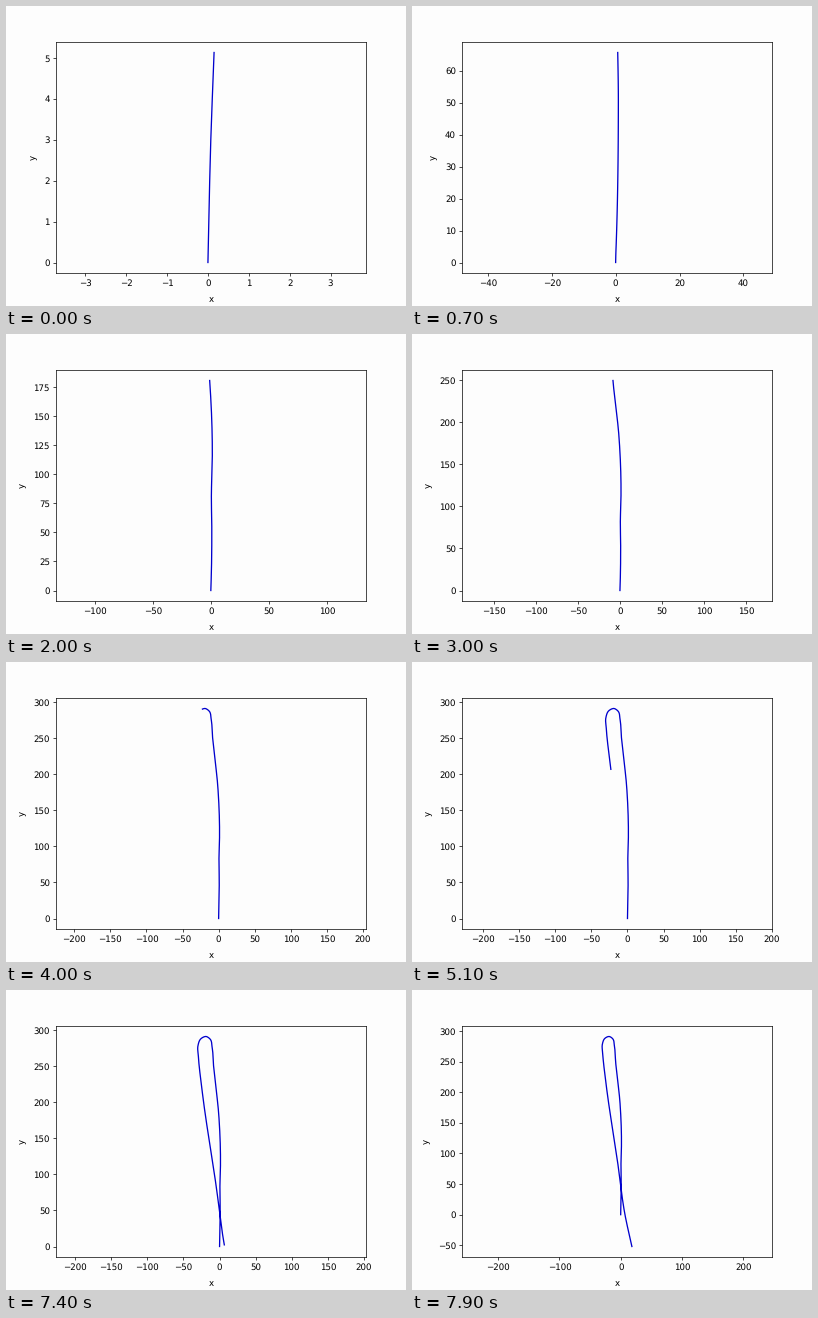
Animation, 400 px wide and 300 px high, one loop 8 s. Source, as a matplotlib script:

```python
import numpy as np
import matplotlib.pyplot as plt
from matplotlib.animation import FuncAnimation

FRAMES, INTERVAL = 80, 100
MARGIN = 0.05
PAPER = "#fdfdfd"

# Key points of the track: straight out, a tight left turn, and back
TRACK = np.array([
    (0, 0), (0.07, 3), (0.15, 5.14), (0.85, 50), (0.5, 85), (1.2, 108),
    (-1, 181), (-8.3, 250), (-10.2, 275), (-13, 287.3), (-18.7, 291),
    (-26, 287.8), (-30, 278), (-29.4, 264), (-24.3, 217),
    (-4.9, 85), (7, 0), (18.3, -52),
])

# Distance covered by a few moments: cruise, brake into the turn, speed up
TICKS = np.array([0, 14, 20, 30, 40, 45, 54, 66, 79])
COVERED = np.array([5.14, 127, 181, 250.4, 298.8, 319.5, 419.3, 508.2, 647.2])


def smooth(x, xs, ys):
    """Cubic Hermite curve through the points (xs, ys)."""
    slope = np.gradient(ys, xs)
    i = np.clip(np.searchsorted(xs, x, side="right") - 1, 0, len(xs) - 2)
    h = xs[i + 1] - xs[i]
    t = (x - xs[i]) / h
    return ((1 + 2 * t) * (1 - t) ** 2 * ys[i]
            + t * (1 - t) ** 2 * h * slope[i]
            + t ** 2 * (3 - 2 * t) * ys[i + 1]
            + t ** 2 * (t - 1) * h * slope[i + 1])


steps = np.hypot(*np.diff(TRACK, axis=0).T)
dist = np.concatenate([[0], np.cumsum(steps)])
head = np.minimum(smooth(np.arange(FRAMES), TICKS, COVERED), dist[-1])

plt.rcParams["text.hinting"] = "none"
fig, ax = plt.subplots(figsize=(6.4, 4.8), dpi=62.5, facecolor=PAPER)
ax.set_facecolor(PAPER)
line, = ax.plot([], [], color="mediumblue", lw=1.5)
ax.set_xlabel("x", labelpad=8)
ax.set_ylabel("y", labelpad=8)
box = ax.get_position()
RATIO = box.width * 6.4 / (box.height * 4.8)


def fit_view(x, y):
    """Equal scales: y fills the axes, x is centred on its data."""
    pad = MARGIN * np.ptp(y)
    ax.set_ylim(y.min() - pad, y.max() + pad)
    half = RATIO * (np.ptp(y) + 2 * pad) / 2
    mid = (x.min() + x.max()) / 2
    ax.set_xlim(mid - half, mid + half)


def update(frame):
    s = np.append(np.arange(0, head[frame], 1.0), head[frame])
    x = smooth(s, dist, TRACK[:, 0])
    y = smooth(s, dist, TRACK[:, 1])
    line.set_data(x, y)
    fit_view(x, y)
    return line,


anim = FuncAnimation(fig, update, frames=FRAMES, interval=INTERVAL,
                     repeat=True, repeat_delay=0)
plt.show()
```
